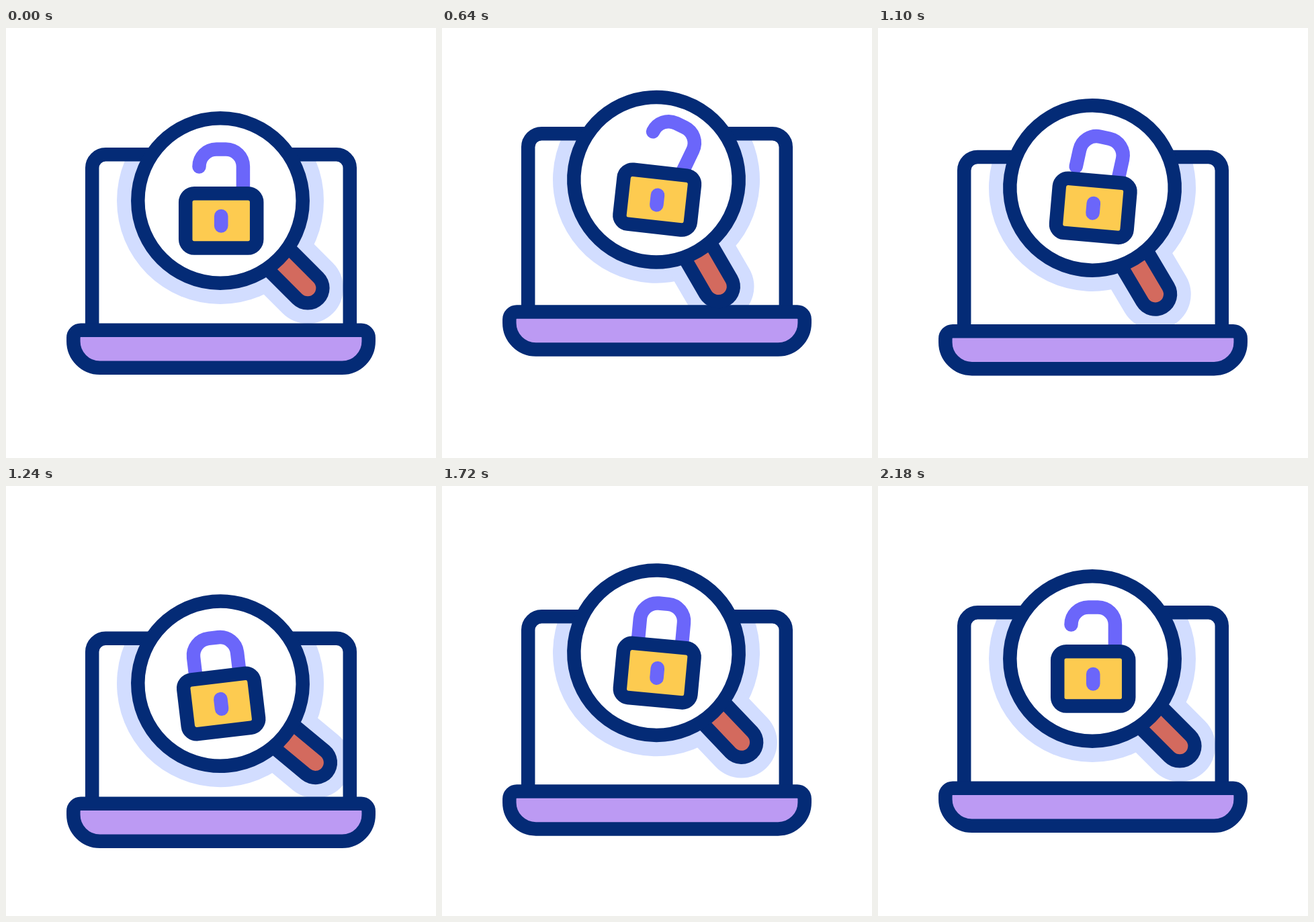
Recreate the animation shown at these times as an HTML page with a canvas. Size 640 px wide and 640 px high, loop 3200 ms.

```html
<!DOCTYPE html>
<html lang="en">
<head>
<meta charset="utf-8">
<title>Lock check</title>
<style>
html, body { margin: 0; width: 100%; height: 100%; overflow: hidden; background: #fff; }
canvas { display: block; width: 100vw; height: 100vh; }
</style>
</head>
<body>
<canvas id="stage" width="640" height="640"></canvas>
<script>
const ctx = document.getElementById('stage').getContext('2d');
const LOOP = 3200, START = 200, LINE = 20.5;
const NAVY = '#042b76', LILAC = '#bc9af3', PALE = '#d2ddff',
      VIOLET = '#6b66fa', GOLD = '#fdcb50', RED = '#d36a5e';

const smooth = u => u * u * (3 - 2 * u);
const easeOut = power => u => 1 - Math.pow(1 - u, power);
const mix = (a, b, u) => a + (b - a) * u;

function ramp(t, from, to, ease = smooth) {
  return ease(Math.min(1, Math.max(0, (t - from) / (to - from))));
}

// Crouch until low, leap until peak, then swing about rest with fading height.
function leap(t, { low, peak, beat, end, jump, land }) {
  if (t < low) return land * ramp(t, START, low);
  if (t < peak) return mix(land, jump, ramp(t, low, peak, easeOut(2.5)));
  const swings = Math.round((end - peak) / beat) - 1;
  const height = k => k ? -land * (-1) ** k * k ** -0.9 : jump;
  const k = Math.min(swings, Math.floor((t - peak) / beat));
  const from = peak + k * beat;
  return k < swings
    ? mix(height(k), height(k + 1), ramp(t, from, from + beat))
    : height(k) * (1 - ramp(t, from, end));
}

// The upper parts follow the base a little later; angles are in degrees.
const heavy = { low: 385, peak: 925, beat: 293, end: 2053 };
const light = { low: 443, peak: 960, beat: 317, end: 2180 };

function poseAt(t) {
  return {
    base: leap(t, { ...heavy, jump: -40, land: 23.7 }),
    screen: leap(t, { ...heavy, low: 420, peak: 930, beat: 295, jump: -53.5, land: 39 }),
    glass: leap(t, { ...light, jump: -62, land: 40.8 }),
    handle: leap(t, { ...light, low: 502, jump: 29.4, land: -6.6 }),
    lock: leap(t, { ...light, low: 417, beat: 370, end: 2100, jump: 12.2, land: -10 }),
    hinge: 25.3 * (ramp(t, 420, 800, easeOut(1.65)) - ramp(t, 960, 1180)),
    leg: 40 * (ramp(t, 960, 1200) - ramp(t, 1560, 2040)),
    press: 8 * (ramp(t, 960, 1220) - ramp(t, 1220, 1520)) +
           4.6 * (ramp(t, 1520, 1840) - ramp(t, 1840, 2180))
  };
}

function paint(fill, stroke, width = LINE) {
  if (fill) { ctx.fillStyle = fill; ctx.fill(); }
  if (stroke) { ctx.strokeStyle = stroke; ctx.lineWidth = width; ctx.stroke(); }
}

function disc(r, fill, stroke) {
  ctx.beginPath();
  ctx.arc(0, 0, r, 0, 2 * Math.PI);
  paint(fill, stroke);
}

function segment(x0, y0, x1, y1, color, width) {
  ctx.beginPath();
  ctx.moveTo(x0, y0);
  ctx.lineTo(x1, y1);
  paint(null, color, width);
}

function layer(x, y, angle, draw) {
  ctx.save();
  ctx.translate(x, y);
  ctx.rotate(angle * Math.PI / 180);
  draw();
  ctx.restore();
}

// An arch centred on x = 0: up the left side, over the top, down the right.
function arch(half, top, left, right, radius) {
  ctx.beginPath();
  ctx.moveTo(-half, left);
  ctx.arcTo(-half, top, 0, top, radius);
  ctx.arcTo(half, top, half, right, radius);
  ctx.lineTo(half, right);
}

function drawScreen(p) {
  const foot = 450 + p.base;
  const outline = () => arch(191.8, 188.3 + p.screen, foot, foot, 20);
  layer(320, 0, 0, () => {
    outline();
    paint('#fff');
    ctx.save();
    ctx.clip();
    layer(-1, 257 + p.glass, 45 + p.handle, () => {
      disc(154, PALE);
      segment(0, 0, 184, 0, PALE, 106);
    });
    ctx.restore();
    outline();
    paint(null, NAVY);
  });
}

function drawBase(p) {
  layer(320, 477.8 + p.base, 0, () => {
    ctx.beginPath();
    ctx.roundRect(-219.7, -28, 439.4, 56, [11, 11, 39.5, 39.5]);
    paint(LILAC, NAVY);
  });
}

function drawGlass(p) {
  layer(319, 257 + p.glass, 45 + p.handle, () => {
    segment(100, 0, 184, 0, NAVY, 65);
    segment(100, 0, 184, 0, RED, 24.5);
    disc(122.7, '#fff', NAVY);
  });
}

function drawLock(p) {
  layer(320.2, 287 + p.glass, p.lock, () => {
    layer(33, p.press - 45, p.hinge, () => {
      ctx.translate(-33, 45);
      arch(32.7, -106.6, p.leg - 80.5, -45, 25.6);
      paint(null, VIOLET);
    });
    ctx.beginPath();
    ctx.roundRect(-53, -40.8, 106, 81.4, 13);
    paint(GOLD, NAVY);
    segment(0, -7, 0, 7.5, VIOLET, 20.6);
  });
}

function drawScene(t) {
  const pose = poseAt(t);
  ctx.fillStyle = '#fff';
  ctx.fillRect(0, 0, 640, 640);
  ctx.lineCap = ctx.lineJoin = 'round';
  drawScreen(pose);
  drawBase(pose);
  drawGlass(pose);
  drawLock(pose);
}

const start = performance.now();
function tick() {
  drawScene((performance.now() - start) % LOOP);
  requestAnimationFrame(tick);
}
tick();
</script>
</body>
</html>
```
